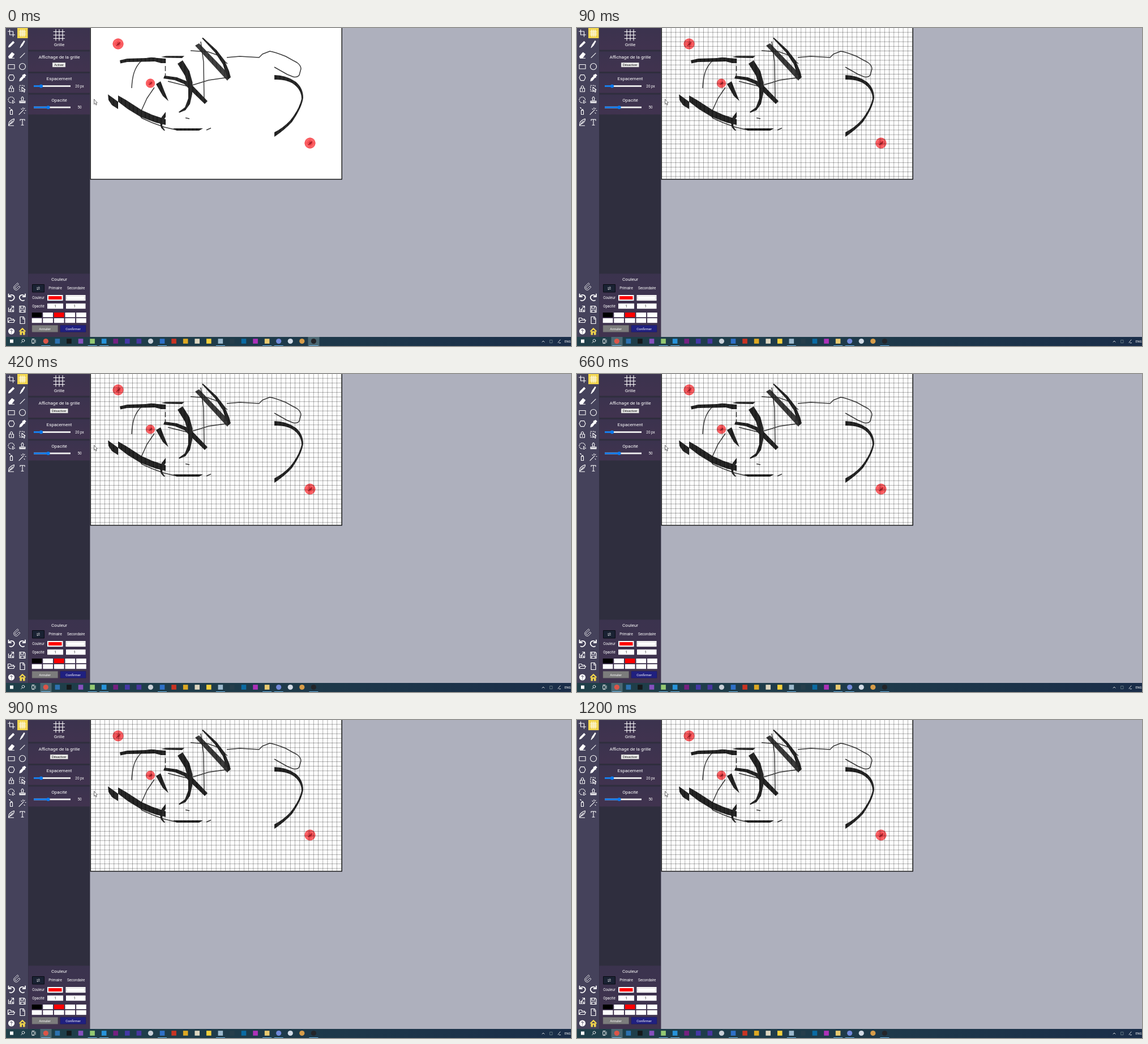
An HTML page for the animation above (1.29 s loop, 998 by 561 pixels).

```html
<!DOCTYPE html>
<html lang="fr">
<head>
<meta charset="utf-8">
<style>
  html, body { margin: 0; width: 100%; height: 100%; overflow: hidden; background: #aeb0bd; }
  svg { display: block; width: 998px; height: 561px; font-family: Roboto, sans-serif; }
  .title { font-size: 8.1px; fill: #fff; text-anchor: middle; }
  .label { font-size: 6.3px; fill: #fff; text-anchor: middle; }
  .button { font: 5.5px "Liberation Sans", Arial, sans-serif; text-anchor: middle; }
  .icon { fill: none; stroke: #fff; stroke-width: 1.1; stroke-linejoin: round; stroke-linecap: round; }
  .thin { fill: none; stroke: #3c3c3c; stroke-width: 1.5; stroke-linejoin: round; }
</style>
</head>
<body>
<svg viewBox="0 0 998 561">
  <defs>
    <linearGradient id="panel" x2="0" y2="1">
      <stop stop-color="#3b334e"/><stop offset="1" stop-color="#41334f"/>
    </linearGradient>
    <linearGradient id="bar">
      <stop stop-color="#1f3f49"/><stop offset=".5" stop-color="#1e3a4a"/><stop offset="1" stop-color="#1a2d49"/>
    </linearGradient>
    <pattern id="ink" width="7" height="10" patternUnits="userSpaceOnUse">
      <path fill="#292929" d="M0 0h7v10h-7z"/><path fill="#1d1d1d" d="M0 0h2v10h-2z"/>
    </pattern>
    <pattern id="cells" x="149.3" y="7.3" width="8.2" height="8.2" patternUnits="userSpaceOnUse">
      <path d="M.4 0V8.2M0 .4H8.2" stroke="#000" stroke-opacity=".42" stroke-width=".8"/>
    </pattern>
    <g id="stamp">
      <circle r="9.5" fill="#ff8686"/>
      <g fill="none" stroke="#f3323a" stroke-width=".9"><circle r="9"/><circle r="7.2"/><circle r="5.3" fill="#ff5a5e"/></g>
      <path d="M-3.5 2.5L2-3L4-2.5L3 0L-2 3.5Z" fill="#a51c25"/>
      <path d="M-2.6-.6L.5-3M0 3L3.3.8" stroke="#a51c25" fill="none"/>
    </g>
  </defs>

  <path fill="#fff" stroke="#000" stroke-width="1.3" d="M149.200-2H593.200V266.800H149.200Z"/>
  <g id="drawing">
    <path class="thin" d="M222 106C223 86 226 70 240 57Q251 51 263 53L281 61M281.500 54v8M281.500 67v9M281.500 80v4M262 105L249 124L239 146Q236 156 240 159L258 167L280 175L302 180M354 180L362 176.500M317 158.500L324 160M326 40L357 42L374 48L391 63M344 24L349 60L350 129M286 94L322 103L358 92L393 87"/>
    <path class="thin" d="M390 52L413 50L447 52L453 46L466 41Q474 42 494 50L514 61Q521 66 521 72L518 83Q514 88 507 86L497 82L474 69"/>
    <g fill="url(#ink)">
      <path d="M201 57L214 54L262 52.500L282 54V62L274 62L263 59L214 60L202 62.500Z"/>
      <path d="M274 51L283 49.300H315L311 53L284 52.500Z"/>
      <path d="M180 117L198 130V143L187 136L181 127Z"/>
      <path d="M198 119L212 127L240 145L258 153L282 161V171L265 167L238 157L215 143L198 130Z"/>
      <path d="M282 148L275 157L272 167L274 176L279 181H281L276 173L277 164L282 157Z"/>
      <path d="M295 177H348L341 181H302Z"/>
      <path d="M265 99L273 94L280 112L287 129L277 120Z"/>
      <path d="M303 63L312 57L324 76L329.500 96L329 116L325 134L317 145L306 149.500L305 148L316 140L322 124L322 104L316 84Z"/>
      <path d="M280 84L302 87L322 95L331 103L356 129L351 134L325 109L315 99L298 92L278 89Z"/>
      <path d="M334 31L341 27L396 84L391 93Z" fill-opacity=".9"/>
      <path d="M348 17L372 39L386 57L394 76L397 87L392 91L383 64L369 43L346 18Z"/>
      <path d="M474 83Q495 83 512 95Q525 106 525 123Q523 140 505 166Q492 180 474 192V184Q490 176 502 163Q518 143 522 125Q522 108 505 97Q492 90 474 91Z"/>
    </g>
    <use href="#stamp" x="198" y="28"/>
    <use href="#stamp" transform="translate(255 97.500) scale(.84)"/>
    <use href="#stamp" x="537" y="203"/>
  </g>
  <path id="grid" fill="url(#cells)" d="M149.800 0H592.600V266H149.800Z"/>
  <path d="M155.500 125.500V134.500L157.500 132.800L159 136L160.300 135.400L159 132.300L161.300 132Z" fill="#eee" stroke="#555" stroke-width=".8"/>

  <path fill="#45425b" d="M0 0H39.500V545H0Z"/>
  <path fill="#2f2e3e" d="M39 0H148.400V545H39Z"/>
  <g fill="url(#panel)">
    <path d="M39.500 0H148V38.500H39.500Z"/><path d="M39.500 41.500H148V77H39.500Z"/>
    <path d="M39.500 80H148V114.500H39.500Z"/><path d="M39.500 117.500H148V152.500H39.500Z"/>
    <path d="M39.500 433.500H148V545H39.500Z"/>
  </g>
  <path class="icon" d="M88 2.500V22M94 2.500V22M100 2.500V22M84 6.500H103.500M84 12.500H103.500M84 18.500H103.500"/>
  <g class="title">
    <text x="94" y="32">Grille</text><text x="94" y="54.300">Affichage de la grille</text>
    <text x="94" y="92.300">Espacement</text><text x="94" y="129.500">Opacité</text>
    <text x="94" y="445.700">Couleur</text>
  </g>
  <g class="label">
    <text x="130" y="105">20 px</text><text x="130" y="142.300">50</text>
    <text x="87" y="461.300">Primaire</text><text x="123.700" y="461.300">Secondaire</text>
    <text x="57" y="478">Couleur</text><text x="57" y="493">Opacité</text>
  </g>
  <rect id="toggle" y="61" height="8" fill="#efefef" stroke="#777" stroke-width=".5"/>
  <text id="toggleText" class="button" x="93.700" y="66.900"></text>
  <g id="sliders"></g>

  <path fill="#1a2233" stroke="#080b12" d="M46.500 452.500H67.500V466H46.500Z"/>
  <path class="icon" style="stroke-width:.7" d="M54.500 458H59.500L58 456.600M59.500 460.500H54.500L56 462"/>
  <g fill="#fff"><path d="M73 471H100.500V481H73ZM105.500 471H140.500V481H105.500ZM73 486H101V495.300H73ZM106 486H140.500V495.300H106Z"/></g>
  <path fill="red" d="M75 473H98.500V479H75Z"/>
  <path fill="none" stroke="#bbb" stroke-width=".6" d="M107 473H139V479H107Z"/>
  <g class="label" style="fill:#222"><text x="87" y="493">1</text><text x="121" y="493">1</text></g>
  <g id="swatches"></g>
  <path fill="#7c7c7c" stroke="#666" stroke-width=".5" d="M46 524.500H91.500V536.300H46Z"/>
  <path fill="#202080" stroke="#17175e" stroke-width=".5" d="M96 524.500H141V536.300H96Z"/>
  <g class="label" style="font-size:6px"><text x="68.500" y="532.500">Annuler</text><text x="118.500" y="532.500">Confirmer</text></g>

  <path fill="#f1d54c" d="M20 0H38.500V18H20Z"/>
  <g id="tools" class="icon"></g>

  <path fill="url(#bar)" d="M0 545H998V561H0Z"/>
  <rect id="active" y="545" width="20" height="16" fill="#4b6873"/>
  <g id="taskbar"></g>
  <g class="icon" style="stroke-width:.8">
    <circle cx="30.500" cy="551.500" r="2.300"/><path d="M28.800 553.300L26.800 555.500M46 550H50V555H46ZM52 550V555M46 548.500H50M46 556.500H50"/>
    <path d="M947 554L949 552L951 554M975 555L979 550M977 555.500H979.500"/>
    <path d="M961 550.500H965V555.500H961Z" stroke="#6f848c"/>
  </g>
  <text class="label" x="992" y="555" style="font-size:5.500px">ENG</text>
</svg>
<script>
const el = id => document.getElementById(id);
const add = (id, markup) => el(id).insertAdjacentHTML("beforeend", markup);
const rect = (x, y, w, h, fill) => `<rect x="${x}" y="${y}" width="${w}" height="${h}" fill="${fill}"/>`;

// Tool icons, each drawn around its own centre, two per row.
const icons = [
  ["M-3-6V3H6M-6-3H3V6"],
  ["M-3-6V6M0-6V6M3-6V6M-6-3H6M-6 0H6M-6 3H6"],
  ["M-5 5L-4 2L3-5L5-3L-2 4Z", 1],
  ["M-4 6L-2 1L3-6L4-5L0 2Z", 1],
  ["M-5 2L1-5L5-2L0 5H-4ZM0 5H5", 1],
  ["M-4 4L4-4"],
  ["M-5.500-3.500H5.500V4H-5.500Z"],
  ["M-5.500 0A5.500 5.500 0 1 1 5.500 0A5.500 5.500 0 1 1-5.500 0Z"],
  ["M-5.500 0L-3-5H3L5.500 0L3 5H-3Z"],
  ["M-5 6L-4 2L1-3L0-4L2-5L4-6L6-4L4-2L4 0L3-1L-2 5Z", 1],
  ["M-4-1H4V5H-4ZM-2-1V-4Q0-7 2-4V-1M0 1V3"],
  ["M-5-6H-3M-1-6H1M-5-4V-2M-5 0V2M-5 4H-3M3-6V-4M-1-3V5L1 3L3 6L4 5L3 2H5Z"],
  ["M-5.500 0A5 5 0 1 1 5 0M-5 2A5 5 0 0 0 0 5M2 1V6L6 4Z", 0, "1.5 1.5"],
  ["M-5 5H5M-5 2H5V4H-5ZM-1 2L-2-3Q0-8 2-3L1 2"],
  ["M-2-1H2V6H-2ZM-1-1V-3H1V-1M-3-5H-2M-4-6H-3"],
  ["M-6 6L2-2M1-6V-4M5-1H6M4-5L3-4M-2-4L-1-3M3 3L4 4"],
  ["M-5 5L-4 0Q0-5 5-6Q5-1 0 2L-2 3ZM-5 6H4M-2 2L2-2"],
  ["M-4-3V-5H4V-3M0-5V5M-2 5H2"],
];
const lowerIcons = [
  ["M-5-6V-1.500H-.5M-4.500-2Q-1-6 3-4Q7-1 4 3Q1 7-3 5"],
  ["M5-6V-1.500H.5M4.500-2Q1-6-3-4Q-7-1-4 3Q-1 7 3 5"],
  ["M-5-2V5H4V1M-3 2L3-4M0-5H4V-1M-2 5V2H2V5"],
  ["M-5-5H3L5-3V6H-5ZM-3-5V-1H2V-5M-3 6V2H3V6"],
  ["M-6 4V-4H-2L0-2H4V0M-6 4L-3 0H6L4 4Z"],
  ["M-4-6H2L4-3V6H-4ZM1-6V-2H4"],
];
const tool = (x, y, [d, solid, dash], width = 1.1) => add("tools",
  `<path transform="translate(${x} ${y})" d="${d}" fill="${solid ? "#fff" : "none"}"
    stroke-dasharray="${dash || "none"}" style="stroke-width:${width}"/>`);
icons.forEach((icon, i) => tool(i % 2 ? 29 : 9.5, 9 + (i >> 1) * 19.65, icon));
lowerIcons.forEach((icon, i) => tool(i % 2 ? 29 : 9.5, 475.5 + (i >> 1) * 20, icon, i < 2 ? 1.8 : 1.2));
tool(19, 456, ["M1-6L-5 0A4.500 4.500 0 0 0 1 6L6 1L4-1L-1 4A2 2 0 0 1-3 1L3-4Z"], .8);
add("tools", `<circle cx="9.500" cy="535" r="5" fill="#fff"/>
  <path d="M8 533.500Q9.500 531 11 533.500L9.500 535.500M9.500 537.500V538" stroke="#45425b"/>
  <path d="M23.500 535L29 529.500L34.500 535M25 535V541H27.500V537H30.500V541H33V535L29 531Z" fill="#f1d54c" stroke="#f1d54c"/>`);

for (const [y, x] of [[102.5, 62], [140, 74.5]]) {
  add("sliders", rect(49, y - 1.4, 65, 2.8, "#efefef") + rect(49, y - 1.4, x - 49, 2.8, "#0b79ee")
    + `<circle cx="${x}" cy="${y}" r="3.1" fill="#0b79ee"/>`);
}

for (let i = 0; i < 10; i++) {
  const fill = i === 0 ? "#000" : i === 2 ? "red" : "#fff";
  add("swatches", rect(45.7 + i % 5 * 19.6, i < 5 ? 502 : 512, 17.6, 8.2, fill));
}

// Taskbar shortcuts: c = circle, s = square; "+" marks an open window.
const shortcuts = `c#db5548+ s#2d72b0 s#15181a s#8650bd s#94c972+ s#2793da+ s#752181 s#4538a7
  s#4936a0 c#c9d0d8 s#2f70c8+ s#c93423 s#dda823 s#ddd6c0 s#f4d03d s#9cb9cd+ s#263e4b
  s#0b6ba3 s#ad31b9 s#e9ca70+ c#7289da+ c#d2dbe6 c#d79c49 c#232529+`.split(/\s+/);
add("taskbar", rect(7, 549.5, 6, 6, "#fff"));
shortcuts.forEach((item, i) => {
  const x = 70.3 + i * 20.57, fill = item.slice(1, 8);
  add("taskbar", item[0] === "c" ? `<circle cx="${x}" cy="552.500" r="4.600" fill="${fill}"/>` : rect(x - 4.3, 548.2, 8.6, 8.6, fill));
  if (item.endsWith("+")) add("taskbar", rect(x - 8, 560, 16, 1, "#70b8e8"));
});

const LOOP = 1290, SWITCH = 90;
const start = performance.now();
function draw() {
  const on = (performance.now() - start) % LOOP >= SWITCH;
  el("grid").setAttribute("visibility", on ? "visible" : "hidden");
  el("toggleText").textContent = on ? "Désactiver" : "Activer";
  el("toggle").setAttribute("x", on ? 78 : 82);
  el("toggle").setAttribute("width", on ? 31.5 : 23);
  el("active").setAttribute("x", on ? 60.5 : 533.5);
  requestAnimationFrame(draw);
}
draw();
</script>
</body>
</html>
```
